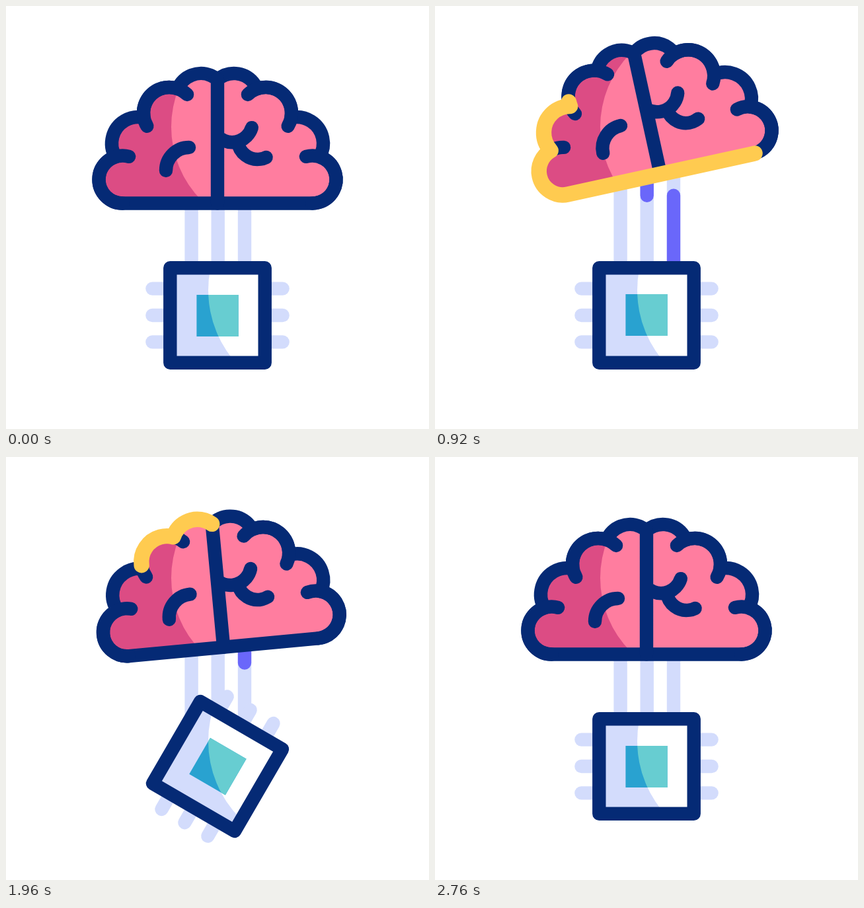
An HTML page with a canvas for the animation above (3.6 s loop, 640x640 px).

```html
<!DOCTYPE html>
<html lang="en">
<head>
<meta charset="utf-8">
<title>Brain and chip</title>
<style>
  html, body { margin: 0; width: 100%; height: 100%; overflow: hidden; background: #fff; }
  canvas { display: block; width: 640px; height: 640px; }
</style>
</head>
<body>
<canvas id="stage" width="640" height="640"></canvas>
<script>
const ctx = document.getElementById('stage').getContext('2d');
const LOOP = 3600;
const NAVY = '#052a75', PINK = '#ff7d9f', ROSE = '#dc4c84', LILAC = '#d3dcfc',
      VIOLET = '#6a67fa', YELLOW = '#ffcb50', TEAL = '#67cdd1', BLUE = '#29a2d0';
const LINE = 20.4;

const rad = deg => deg * Math.PI / 180;
const clamp = x => Math.min(1, Math.max(0, x));
const smooth = x => x * x * (3 - 2 * x);
const cubic = x => x < 0.5 ? 4 * x ** 3 : 1 - 4 * (1 - x) ** 3;
const progress = (t, start, length, ease = smooth) => ease(clamp((t - start) / length));

// Keys are [time, value, easing towards this key].
function track(keys, t) {
  for (let i = 1; i < keys.length; i++) {
    const [t0, v0] = keys[i - 1], [t1, v1, ease] = keys[i];
    if (t < t1) return v0 + (v1 - v0) * progress(t, t0, t1 - t0, ease);
  }
  return keys[keys.length - 1][1];
}

const LIFT = [[0, 0], [430, 3], [1100, -51.5], [1630, 23.2, cubic],
              [2165, -26.5], [2460, 12.7], [2750, 0]];
const TILT = [[0, 0], [338, 0], [735, -13], [1050, -12], [1560, 8],
              [1930, -5.5], [2300, 2], [2660, 0]];

// Right-hand lobes, top to bottom: centre, radius, start and end angle.
const LOBES = [
  [345, 140, 38, -131, -22.9],
  [393, 162, 39, -109.3, 10.3],
  [440, 208, 40, -102.4, 30.5],
  [463.5, 262.5, 36, -72.2, 90]
];
const mirrored = ([x, y, r, a, b]) => [640 - x, y, r, 180 - b, 180 - a];
const RING = [...LOBES, ...LOBES.map(mirrored).reverse()];

function addArc(path, [x, y, r, a, b]) {
  path.moveTo(x + r * Math.cos(rad(a)), y + r * Math.sin(rad(a)));
  path.arc(x, y, r, rad(a), rad(b), b < a);
}

const outline = new Path2D();
for (const [x, y, r, a, b] of RING) outline.arc(x, y, r, rad(a), rad(b));
const ringLength = 287 + RING.reduce((sum, [, , r, a, b]) => sum + r * rad(b - a), 0);

const folds = new Path2D();
for (const curl of [[393, 162, 39, -134, 30.5], [463.5, 262.5, 36, -105.4, 90]]) {
  addArc(folds, curl);
  addArc(folds, mirrored(curl));
}
addArc(folds, [277, 249, 35, 180, 270]);
addArc(folds, [342, 175, 31.2, 135, 17]);
addArc(folds, [380.5, 202, 30, 172, 64]);
folds.moveTo(320, 111);
folds.lineTo(320, 298.4);

function stroke(path, color, width = LINE) {
  ctx.strokeStyle = color;
  ctx.lineWidth = width;
  ctx.stroke(path);
}

function line(x0, y0, x1, y1, color) {
  const path = new Path2D();
  path.moveTo(x0, y0);
  path.lineTo(x1, y1);
  stroke(path, color);
}

function place(x, y, angle) {
  ctx.translate(x, y);
  ctx.rotate(rad(angle));
}

// Fills a moving shape in two tones; the light area stays still on the stage.
function twoTone(shape, dark, light, cx, cy, r) {
  ctx.fillStyle = dark;
  ctx.fill(shape);
  ctx.save();
  ctx.clip(shape);
  ctx.setTransform(1, 0, 0, 1, 0, 0);
  ctx.fillStyle = light;
  ctx.beginPath();
  ctx.arc(cx, cy, r, 0, 2 * Math.PI);
  ctx.rect(cx, 0, 640 - cx, 640);
  ctx.fill();
  ctx.restore();
}

function square(half, dy = 0) {
  const path = new Path2D();
  path.rect(-half, dy - half, 2 * half, 2 * half);
  return path;
}
const frame = square(71.7), core = square(31.6, 0.5);

function drawWires(t) {
  const wireY = p => 440 - 240 * p;
  [280.6, 320.7, 361].forEach((x, i) => {
    ctx.lineCap = 'butt';
    line(x, 220, x, 396, LILAC);
    ctx.lineCap = 'round';
    for (const start of [161, 931]) {
      const head = progress(t, start + 291 * i, 300);
      const tail = progress(t, start + 291 * (i + 1), 300);
      if (head > tail) line(x, wireY(tail), x, wireY(head), VIOLET);
    }
  });
}

function drawChip(t) {
  const turns = progress(t, 88, 848, cubic) + progress(t, 1483, 848, cubic);
  ctx.save();
  place(320, 468, 180 * turns);
  for (const y of [-40.4, 0, 40.4]) line(-98.6, y, 98.6, y, LILAC);
  twoTone(frame, LILAC, '#fff', 471, 430, 165);
  twoTone(core, BLUE, TEAL, 471, 430, 165);
  stroke(frame, NAVY);
  ctx.restore();
}

function drawGlow(t, start) {
  const head = progress(t, start, 787), tail = progress(t, start + 281, 787);
  if (head <= tail) return;
  ctx.setLineDash([(head - tail) * ringLength, 2 * ringLength]);
  ctx.lineDashOffset = -tail * ringLength;
  stroke(outline, YELLOW, 23.4);
  ctx.setLineDash([]);
}

function drawBrain(t) {
  ctx.save();
  place(320, 200 + track(LIFT, t), track(TILT, t));
  ctx.translate(-320, -200);
  twoTone(outline, ROSE, PINK, 408, 183, 158);
  stroke(outline, NAVY);
  stroke(folds, NAVY);
  drawGlow(t, 326);
  drawGlow(t, 1086);
  ctx.restore();
}

function draw(t) {
  ctx.fillStyle = '#fff';
  ctx.fillRect(0, 0, 640, 640);
  ctx.lineJoin = 'round';
  drawWires(t);
  drawChip(t);
  drawBrain(t);
}

const began = performance.now();
function tick() {
  draw((performance.now() - began) % LOOP);
  requestAnimationFrame(tick);
}
tick();
</script>
</body>
</html>
```
